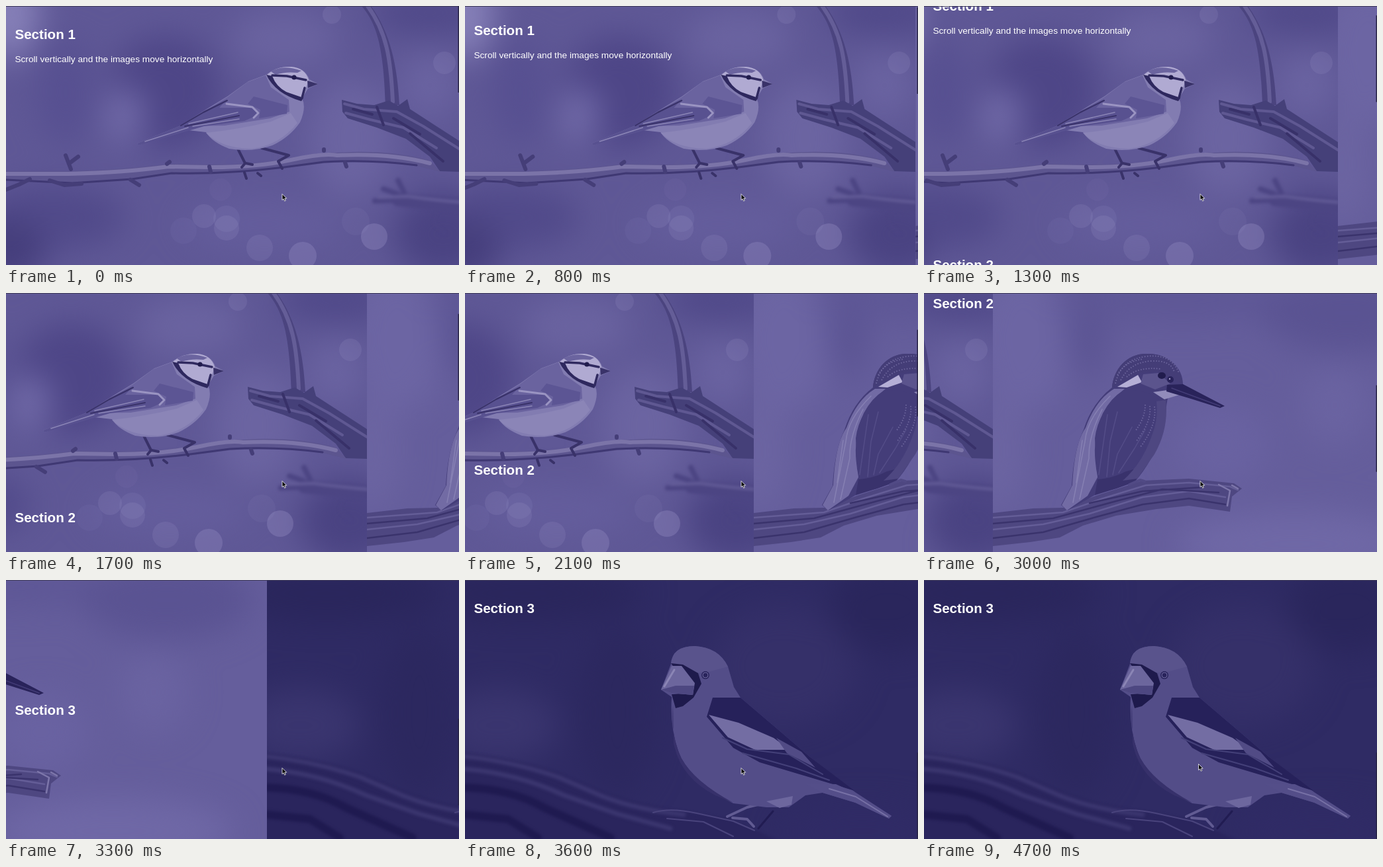
An HTML page that plays this animation: 684x392 px, repeating every 5.6 s.

```html
<!DOCTYPE html>
<html lang="en">
<head>
<meta charset="utf-8">
<title>Horizontal scroll</title>
<style>
html, body { margin: 0; width: 100%; height: 100%; overflow: hidden; background: #5d5693; }
body > svg { display: block; width: 684px; height: 392px; }
text { font-family: "Liberation Sans", Arial, sans-serif; font-size: 13.7px; fill: #fff; }
.title { font-size: 20.6px; font-weight: bold; }
.soft { filter: blur(24px); }
.haze { filter: blur(2px); }
.edge { filter: blur(.6px); }
.line { fill: none; stroke-linecap: round; stroke-linejoin: round; }
.specks { fill: none; stroke: #6d669d; stroke-width: 1.8; stroke-dasharray: 1.5 2.5; }
</style>
</head>
<body>
<svg viewBox="0 0 684 392">
  <g id="track">
    <svg width="687" height="392" viewBox="0 0 687 392">
      <rect width="687" height="392" fill="#5f5896"/>
      <g class="soft">
        <ellipse cx="5" cy="10" rx="45" ry="70" fill="#8680b8"/>
        <ellipse cx="240" cy="130" rx="85" ry="85" fill="#4e4687"/>
        <ellipse cx="90" cy="130" rx="45" ry="80" fill="#575091"/>
        <ellipse cx="180" cy="165" rx="30" ry="42" fill="#716aa8"/>
        <ellipse cx="70" cy="320" rx="110" ry="50" fill="#514a8a"/>
        <ellipse cx="0" cy="370" rx="60" ry="50" fill="#453e7c"/>
        <ellipse cx="420" cy="50" rx="80" ry="45" fill="#6a63a0"/>
        <ellipse cx="520" cy="200" rx="65" ry="90" fill="#6b64a1"/>
        <ellipse cx="640" cy="10" rx="90" ry="35" fill="#504989"/>
        <ellipse cx="640" cy="120" rx="45" ry="50" fill="#6a63a1"/>
        <ellipse cx="660" cy="345" rx="75" ry="65" fill="#4a4382"/>
        <ellipse cx="390" cy="330" rx="120" ry="40" fill="#645d9c"/>
      </g>
      <g class="edge" fill="#aaa4d3" fill-opacity=".14">
        <circle cx="324" cy="278" r="17" fill-opacity=".05"/>
        <circle cx="299" cy="318" r="18"/>
        <circle cx="333" cy="322" r="20" fill-opacity=".1"/>
        <circle cx="333" cy="336" r="19"/>
        <circle cx="268" cy="340" r="20" fill-opacity=".06"/>
        <circle cx="383" cy="366" r="20"/>
        <circle cx="448" cy="378" r="21" fill-opacity=".24"/>
        <circle cx="556" cy="349" r="20" fill-opacity=".26"/>
        <circle cx="528" cy="326" r="21" fill-opacity=".07"/>
        <circle cx="662" cy="86" r="17"/>
        <circle cx="492" cy="13" r="14"/>
      </g>
      <g class="haze line" stroke="#4c4583">
        <path d="M592 293Q640 298 687 302" stroke-width="20"/>
        <path d="M557 295L612 293M592 264L604 288M570 277L590 284" stroke-width="8"/>
        <path d="M648 313L647 330 662 344" stroke-width="3"/>
        <path d="M562 290L606 288Q640 293 687 297" stroke="#655e99" stroke-width="4"/>
      </g>
      <g class="edge">
        <path d="M537 0C558 25 570 55 573 150H594C591 90 580 40 551 0Z" fill="#4b447f"/>
        <path class="line" d="M546 0C575 40 581 80 584 145" stroke="#645d97" stroke-width="6"/>
        <path d="M507 142L530 148 556 150 578 143 592 151 606 141 610 156 650 182 687 206V251L655 250 640 228 604 201 560 184 516 170 508 160Z" fill="#454079"/>
        <path class="line" d="M511 148L540 156 590 160 630 182 687 218M513 162L550 172 600 184 650 215" stroke="#5f5892" stroke-width="4"/>
        <path class="line" d="M524 156L553 164M560 153L570 180M585 170L625 194M610 193L660 235" stroke="#383169" stroke-width="4"/>
        <path d="M0 250L95 250Q180 248 245 239L310 240Q380 240 430 230T500 222Q580 217 640 234L656 251 620 242Q550 233 480 238L420 246 370 251Q290 257 250 255L190 264 100 270 0 264Z" fill="#5c558f"/>
        <path class="line" d="M0 254L95 254Q180 252 245 243L310 244Q380 244 430 233T500 226Q580 222 640 238" stroke="#7b74a8" stroke-width="6"/>
        <path class="line" d="M0 263L100 268 190 262 250 253Q330 255 420 244L480 236Q550 232 620 241" stroke="#3f3873" stroke-width="3"/>
        <path class="line" d="M98 247L90 226M97 237L109 228M0 278L20 270 36 262M66 264L88 271 114 269M188 263L201 271M512 237L514 243M480 219L480 217M307 243L309 251M243 239L247 236" stroke="#453e78" stroke-width="6"/>
        <path class="line" d="M350 216L361 238 356 244M362 238L372 240M386 215L427 226 411 235 417 246M360 252L363 261M380 253L385 257" stroke="#393269" stroke-width="4"/>
        <path d="M198 208L264 181 298 159 334 137 366 114 393 104Q408 91 431 92 452 94 458 111L471 118 456 125 447 140Q454 153 444 176 428 199 402 211 371 222 337 216 311 206 302 191L267 187 200 211Z" fill="#827cb1"/>
        <path d="M392 105L365 115 334 138 298 160 266 182 330 181 399 170 428 160 427 142 400 123Z" fill="#6a639f"/>
        <path d="M198 208L264 181 298 159 334 141 322 154 374 154 382 164 360 174 299 182 200 211Z" fill="#585190"/>
        <path d="M374 137L425 150 424 163 382 170 384 157 365 148Z" fill="#5c5594"/>
        <path class="line" d="M264 181L298 161 334 143M270 182L352 166" stroke="#393269" stroke-width="2"/>
        <path class="line" d="M333 148L372 153 381 162 374 169" stroke="#9a94c2" stroke-width="3"/>
        <path class="line" d="M276 178L350 161M282 182L352 171M210 205L275 184" stroke="#8b85b6" stroke-width="1.5"/>
        <path d="M302 192Q350 187 400 175L430 162 440 177Q413 211 371 216 324 215 302 192Z" fill="#8b85b7"/>
        <path d="M393 105Q408 91 431 92 452 94 457 112L448 140 425 131 405 118Z" fill="#b0aad2"/>
        <path d="M400 99Q419 88 446 98L440 101Q422 99 407 104Z" fill="#6b649f"/>
        <path d="M393 104L402 106Q408 122 423 130L449 139 446 144Q407 133 393 104Z" fill="#2e285e"/>
        <path class="line" d="M402 105L424 106 453 112M451 124L447 139" stroke="#302a60" stroke-width="3.5"/>
        <path d="M455 113L471 118 456 124Z" fill="#393269"/>
        <circle cx="435" cy="108" r="3.5" fill="#211c4d"/>
      </g>
    </svg>

    <svg x="687" width="687" height="392" viewBox="104 0 687 392">
      <rect x="104" width="687" height="392" fill="#655e9c"/>
      <g class="soft">
        <ellipse cx="150" cy="70" rx="75" ry="110" fill="#6c65a3"/>
        <ellipse cx="245" cy="45" rx="30" ry="90" fill="#5a5392"/>
        <ellipse cx="390" cy="10" rx="200" ry="35" fill="#5e5796"/>
        <ellipse cx="640" cy="30" rx="130" ry="60" fill="#5a5392"/>
        <ellipse cx="620" cy="170" rx="50" ry="60" fill="#6a63a1"/>
        <ellipse cx="450" cy="230" rx="70" ry="60" fill="#6962a1"/>
        <ellipse cx="560" cy="380" rx="180" ry="50" fill="#6f68a6"/>
        <ellipse cx="110" cy="240" rx="45" ry="90" fill="#6b64a1"/>
      </g>
      <g class="edge">
        <path d="M104 333L165 326 210 325 262 306 330 284 400 281 468 288 480 296 465 308 462 331 442 328 400 322 351 327 290 337 240 352 205 370 160 377 104 383Z" fill="#4e4781"/>
        <path class="line" d="M104 340L210 332 270 311 335 291 400 287 462 293 474 298M104 358L180 350 250 334 330 309 400 300 455 309" stroke="#645d97" stroke-width="2.5"/>
        <path class="line" d="M104 349L195 341 290 315 360 297 445 302M104 371L180 362 260 339 330 320 400 311 455 320M250 318L330 300 420 294" stroke="#3a336c" stroke-width="2.5"/>
        <path class="line" d="M445 290L462 299 458 322M465 291L474 296" stroke="#7d76aa" stroke-width="2.5"/>
        <path d="M284 143C286 116 306 91 337 92 368 91 392 113 391 140L370 154Q366 161 364 195 350 250 318 286L290 296 263 303 217 329 207 321 223 292Q226 238 241 207 254 166 284 143Z" fill="#443d79"/>
        <path d="M262 282L334 262 318 286 290 296 258 306Z" fill="#39326c"/>
        <path d="M287 145L303 145Q263 178 258 220L262 279 247 307 216 329 208 321 224 291Q227 228 244 204 259 162 287 145Z" fill="#726ba4"/>
        <path class="line" d="M281 156Q246 190 243 225L225 317M269 176Q248 217 249 250L235 312M239 223L230 287" stroke="#8680b3" stroke-width="1.5"/>
        <path d="M300 148Q341 145 357 164 360 204 334 244 309 278 263 282 250 224 270 182 282 159 300 148Z" fill="#443d79"/>
        <path class="line" d="M277 184L264 275M292 180L281 225 276 278M314 203L292 244 285 275M334 207L318 235 294 272" stroke="#544d88" stroke-width="1.5"/>
        <path d="M365 162Q370 205 348 244L322 281 300 284Q330 258 345 213 354 190 351 164Z" fill="#4e4781"/>
        <path class="specks" d="M348 172Q352 200 326 234M341 171Q344 195 320 225M334 169Q334 189 319 209"/>
        <path d="M284 143C286 116 306 91 337 92 368 91 387 112 390 137L351 119 326 121Z" fill="#443d77"/>
        <path class="specks" d="M289 137Q297 101 335 96T385 121M297 132Q311 105 342 103T378 120M306 127Q323 111 358 115M292 124Q304 103 331 100"/>
        <path d="M292 142L323 124 329 135 306 143Z" fill="#b5afd6"/>
        <path d="M346 150L367 147 386 154 363 161Z" fill="#928cbb"/>
        <path d="M331 123L354 121 372 137 349 146 327 137Z" fill="#5b548d"/>
        <path d="M367 139L391 138 454 171 447 174 403 160 366 149Z" fill="#29235a"/>
        <path class="line" d="M374 144L447 171" stroke="#433c77" stroke-width="1.5"/>
        <ellipse cx="359" cy="125" rx="6" ry="5" fill="#211c4d"/>
        <circle cx="372" cy="131" r="5" fill="#29235a"/>
        <circle cx="371" cy="130" r="1.2" fill="#a49ecb"/>
        <path class="line" d="M310 290L326 283 333 285" stroke="#514a85" stroke-width="4"/>
      </g>
    </svg>

    <svg x="1374" width="687" height="392" viewBox="0 0 687 392">
      <rect width="687" height="392" fill="#2f2b64"/>
      <g class="soft">
        <ellipse cx="50" cy="220" rx="90" ry="55" fill="#3a356f"/>
        <ellipse cx="480" cy="130" rx="110" ry="90" fill="#353069"/>
        <ellipse cx="90" cy="20" rx="180" ry="45" fill="#2a265c"/>
        <ellipse cx="640" cy="40" rx="90" ry="70" fill="#2a265c"/>
        <ellipse cx="230" cy="200" rx="60" ry="130" fill="#2c285f"/>
        <ellipse cx="600" cy="380" rx="130" ry="40" fill="#302b66"/>
      </g>
      <path class="haze" d="M-5 262Q70 269 140 292L207 321Q260 342 330 350L400 362 440 379 475 396H-5Z" fill="#2a255d"/>
      <path class="haze line" d="M0 267Q70 274 140 298L207 327Q260 348 330 355M0 286Q80 293 150 326L230 354 310 376" stroke="#3b366f" stroke-width="7"/>
      <path class="haze line" d="M0 314Q70 316 120 345L220 390M0 355L65 362 110 390" stroke="#1f1a50" stroke-width="12"/>
      <path class="edge line" d="M284 352Q310 344 350 353L405 365 437 379M305 361L360 366 405 388" stroke="#4a447d" stroke-width="2"/>
      <g class="edge">
        <path class="line" d="M454 337L426 344 396 358M404 360L426 362 436 373" stroke="#615b92" stroke-width="4"/>
        <path class="line" d="M465 350L443 376" stroke="#211c52" stroke-width="3"/>
        <path d="M311 127Q313 100 347 100 383 102 397 131L406 162 416 178 470 224 520 267 589 321 644 357 640 361 589 337 540 322 514 326 489 344 455 344 405 338Q350 312 326 269 309 230 312 177L296 166Z" fill="#534d88"/>
        <path d="M314 190Q310 235 327 270 346 305 405 337L378 326Q325 299 315 247Z" fill="#37316b"/>
        <path d="M374 178L416 178 470 224 520 267 588 319 562 311 505 294 445 276 405 254 365 207Z" fill="#26215a"/>
        <path d="M368 204L413 216 466 239 491 257 438 257 397 238Z" fill="#736da3"/>
        <path class="line" d="M389 239L426 256 489 264 540 294M419 262L500 285 550 303" stroke="#444079" stroke-width="2"/>
        <path d="M470 239L508 260 529 284 486 262Z" fill="#514b85"/>
        <path d="M455 335L495 327 493 340 475 345Z" fill="#6d679e"/>
        <path d="M514 308L560 309 591 323 644 357 640 361 590 337 540 322Z" fill="#544e89"/>
        <path class="line" d="M550 316L590 328 638 358" stroke="#7771a6" stroke-width="2"/>
        <path d="M311 127Q313 100 347 100 383 102 397 131L368 139 346 141 329 129Z" fill="#59538c"/>
        <path d="M311 126L329 128 352 141 357 157 345 178 329 191 318 194 312 173 344 171Z" fill="#1e1a4c"/>
        <path d="M312 130L327 130 347 156 344 174 311 171 296 166Z" fill="#6c669d"/>
        <path d="M296 166L318 160 346 160 344 174 311 171Z" fill="#4d4781"/>
        <path class="line" d="M316 136L301 161" stroke="#8b85b5" stroke-width="3"/>
        <circle cx="363" cy="144" r="6" fill="#28235b"/>
        <circle cx="363" cy="144" r="4" fill="none" stroke="#6f69a0"/>
      </g>
    </svg>
  </g>

  <g id="page">
    <text class="title" x="13.4" y="50">Section 1</text>
    <text x="13.4" y="85">Scroll vertically and the images move horizontally</text>
    <text class="title" x="13.4" y="442">Section 2</text>
    <text class="title" x="13.4" y="834">Section 3</text>
  </g>
  <rect width="684" height="1" fill="#413d5b"/>
  <rect id="thumb" x="682.5" width="1.5" height="131" fill="#272344"/>
  <path id="cursor" d="M0 0V9.2L2.1 7.3 3.6 10.7 5.2 10 3.8 6.7H6.7Z" fill="#000" stroke="#fff" stroke-width=".8"/>
</svg>
<script>
const LOOP = 5600;
const ticks = [0, 700, 800, 900, 1100, 1200, 1300, 1500, 1600, 1700, 2000, 2100,
  2300, 2400, 2600, 2700, 2900, 3000, 3200, 3300, 3500, 3600, 4600, 4700];
// time, page scroll, track shift
const keys = [[600, 0, 0], [900, 9, 10], [1300, 43, 62], [1700, 95, 142], [2100, 167, 251],
  [2400, 234, 361], [2700, 318, 467], [3000, 419, 583], [3300, 630, 980], [3500, 765, 1330], [3600, 784, 1374]];
const [track, page, thumb, cursor] = ['track', 'page', 'thumb', 'cursor'].map(id => document.getElementById(id));

function valueAt(time, column) {
  const next = keys.findIndex(key => key[0] > time);
  if (next === 0) return 0;
  if (next < 0) return keys.at(-1)[column];
  const a = keys[next - 1], b = keys[next];
  return a[column] + (b[column] - a[column]) * (time - a[0]) / (b[0] - a[0]);
}

const move = (node, x, y) => node.setAttribute('transform', `translate(${x} ${y})`);

function draw(now) {
  const time = now % LOOP;
  const tick = ticks.findLast(start => start <= time);
  const scroll = valueAt(tick, 1);
  const nudge = Math.min(1, Math.max(0, (tick - 4500) / 200));
  move(track, -valueAt(tick, 2), 0);
  move(page, 0, -scroll);
  move(thumb, 0, scroll / 3);
  move(cursor, 417 - 2.5 * nudge, 284.5 - 6 * nudge);
}

const start = performance.now();
function loop() {
  draw(Math.max(0, performance.now() - start));
  requestAnimationFrame(loop);
}
loop();
</script>
</body>
</html>
```
